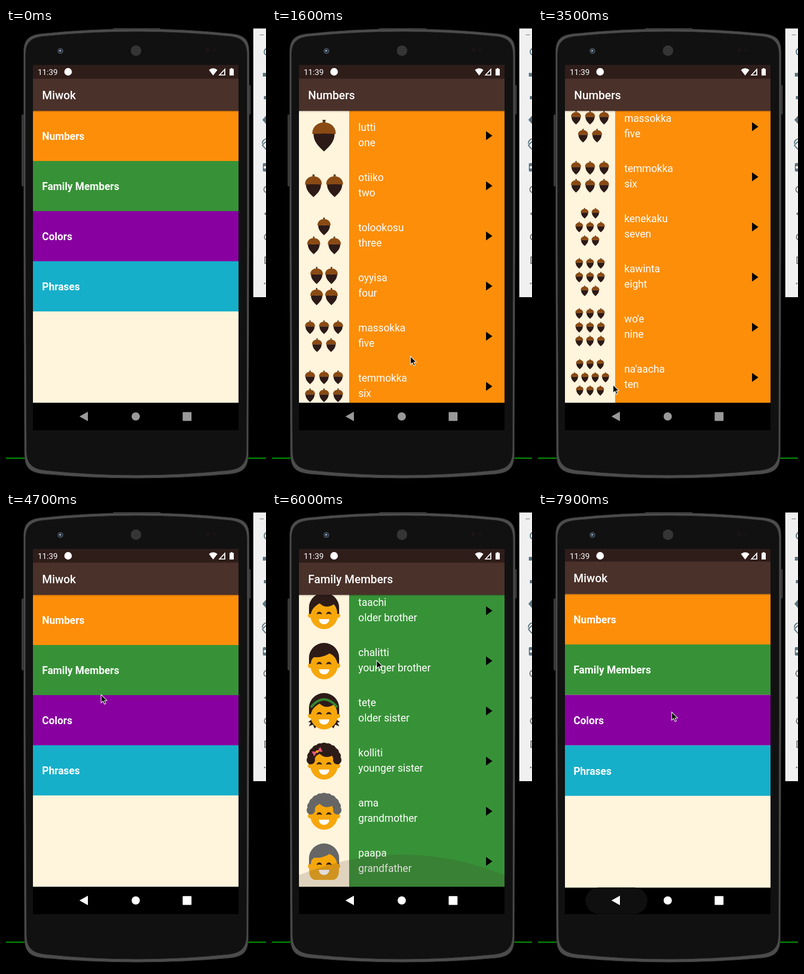
An HTML page for the animation above (8000 ms loop, 492x864 px).

```html
<!DOCTYPE html>
<html lang="en">
<head>
<meta charset="utf-8">
<title>Phone demo</title>
<style>
html, body { margin: 0; width: 100%; height: 100%; overflow: hidden; background: #000; }
svg { display: block; width: 492px; height: 864px; font-family: Roboto, "Noto Sans", sans-serif; }
.bar { font-size: 21.6px; font-weight: 500; fill: #fff; }
.cat { font-size: 19.5px; font-weight: 700; fill: #fff; }
.word { font-size: 19.5px; fill: #fff; }
.clock { font-size: 15.2px; fill: #fff; }

.win { transform-origin: 245.5px 416px; }
.glow { transform-origin: 245.5px 710px; }
.win, .fade, .dim, .list, .glow, .keys, .ripple, .cursor { animation: 8s linear infinite; }

#home { animation-name: home; }
@keyframes home {
  0%, 9.875% { transform: scale(1); animation-timing-function: cubic-bezier(.05,.7,.1,1); }
  14.875%, 50.62% { transform: scale(1.05); }
  50.625% { transform: scale(1.1); animation-timing-function: cubic-bezier(.05,.7,.1,1); }
  55.625% { transform: scale(1); }
  62.5% { transform: scale(1); animation-timing-function: cubic-bezier(.05,.7,.1,1); }
  67.5%, 96.245% { transform: scale(1.05); }
  96.25% { transform: scale(1.1); animation-timing-function: cubic-bezier(.1,.45,.4,1); }
  100% { transform: scale(1); }
}
.dim { animation-name: dim; }
@keyframes dim {
  0%, 9.875% { opacity: 0; }
  11%, 50.62% { opacity: .22; }
  50.625%, 62.5% { opacity: 0; }
  63.6%, 96.245% { opacity: .22; }
  96.25%, 100% { opacity: 0; }
}
#numbers { animation-name: numbers; }
@keyframes numbers {
  0%, 9.875% { transform: scale(.85); animation-timing-function: cubic-bezier(.05,.7,.1,1); }
  14.875% { transform: scale(1); }
  50.625% { transform: scale(1); animation-timing-function: cubic-bezier(.05,.7,.1,1); }
  55.625%, 100% { transform: scale(.9); }
}
#numbersFade { animation-name: numbersFade; }
@keyframes numbersFade {
  0%, 10.31% { opacity: 0; }
  10.94%, 51.06% { opacity: 1; }
  51.69%, 100% { opacity: 0; }
}
#numbers .list { animation-name: numbersList; }
@keyframes numbersList {
  0%, 20.625% { transform: translateY(0); animation-timing-function: cubic-bezier(.45,0,.5,1); }
  28.1%, 100% { transform: translateY(-397px); }
}
#numbers .glow { animation-name: numbersGlow; }
@keyframes numbersGlow {
  0%, 27.5% { transform: scaleY(0); opacity: 0; }
  28.6%, 29.4% { transform: scaleY(.46); opacity: .17; }
  33.75%, 100% { transform: scaleY(0); opacity: 0; }
}
#family { animation-name: family; }
@keyframes family {
  0%, 62.5% { transform: scale(.85); animation-timing-function: cubic-bezier(.05,.7,.1,1); }
  67.5% { transform: scale(1); }
  96.25% { transform: scale(1); animation-timing-function: cubic-bezier(.1,.45,.4,1); }
  100% { transform: scale(.9); }
}
#familyFade { animation-name: familyFade; }
@keyframes familyFade {
  0%, 62.94% { opacity: 0; }
  63.56%, 96.69% { opacity: 1; }
  97.31%, 100% { opacity: 0; }
}
#family .list { animation-name: familyList; }
@keyframes familyList {
  0%, 68.125% { transform: translateY(0); animation-timing-function: cubic-bezier(.45,0,.5,1); }
  74.4%, 100% { transform: translateY(-397px); }
}
#family .glow { animation-name: familyGlow; }
@keyframes familyGlow {
  0%, 73.75% { transform: scaleY(0); opacity: 0; }
  74.9%, 76.25% { transform: scaleY(1); opacity: .17; }
  81.9%, 100% { transform: scaleY(0); opacity: 0; }
}
.keys { animation-name: keys; }
@keyframes keys {
  0%, 49.3% { fill: #999; }
  50.6%, 100% { fill: #fff; }
}
.ripple { animation-name: ripple; }
@keyframes ripple {
  0%, 49.3% { opacity: 0; }
  50%, 51.5% { opacity: 1; }
  55%, 95% { opacity: 0; }
  95.9%, 98.9% { opacity: 1; }
  100% { opacity: .6; }
}
.cursor { animation-name: cursor; animation-timing-function: ease-in-out; }
@keyframes cursor {
  0%, 2.5% { transform: translate(500px, 300px); }
  8.75%, 9.75% { transform: translate(285px, 216px); }
  11.25% { transform: translate(279px, 242px); }
  18.75%, 20.625% { transform: translate(262px, 622px); animation-timing-function: cubic-bezier(.45,0,.5,1); }
  28.5%, 29.4% { transform: translate(255px, 202px); }
  43.75% { transform: translate(142px, 676px); }
  46.25%, 50.6% { transform: translate(146px, 735px); }
  58.1%, 58.75% { transform: translate(180px, 346px); }
  61.25%, 62.4% { transform: translate(185px, 312px); }
  67.5%, 68.125% { transform: translate(205px, 640px); animation-timing-function: cubic-bezier(.45,0,.5,1); }
  74.9%, 76.9% { transform: translate(198px, 281px); }
  88.75%, 96% { transform: translate(150px, 737px); }
  98.75% { transform: translate(253px, 379px); }
  100% { transform: translate(258px, 366px); }
}
</style>
</head>
<body>
<svg viewBox="0 0 492 864">
  <defs>
    <clipPath id="screen"><rect x="51" y="70" width="389" height="692"/></clipPath>
    <clipPath id="view"><rect x="51" y="157" width="389" height="553"/></clipPath>
    <linearGradient id="shade" x2="0" y2="1"><stop stop-opacity=".25"/><stop offset="1" stop-opacity="0"/></linearGradient>
    <pattern id="mesh" width="3" height="3" patternUnits="userSpaceOnUse">
      <rect width="3" height="3" fill="#222"/><circle cx="1.5" cy="1.5" r="1" fill="#5a5a5a"/>
    </pattern>
    <g id="acorn">
      <path d="M-3-30H3L2-23H-2Z" fill="#4a3a20"/>
      <path d="M-20-4H20C20 13 8 22 0 30C-8 22-20 13-20-4Z" fill="#2d1a17"/>
      <path d="M-22-3C-23-17-12-25 0-25S23-17 22-3Q0-5-22-3Z" fill="#8a4a14"/>
    </g>
    <g id="head" fill="#f6a70c">
      <circle cx="-26" cy="9" r="4.5"/><circle cx="26" cy="9" r="4.5"/>
      <ellipse cy="8" rx="26" ry="27"/>
    </g>
    <g id="smile">
      <path d="M-14 7a5 5 0 0 1 10 0q-5-2-10 0ZM4 7a5 5 0 0 1 10 0q-5-2-10 0Z" fill="#3a2418"/>
      <path d="M-10 16H10C9 29-9 29-10 16Z" fill="#fff"/>
    </g>
  </defs>

  <path d="M0 815H492" stroke="#00a000" stroke-width="2"/>

  <!-- emulator toolbar -->
  <path d="M468 1H492V510H468Z" fill="#f0f0f0"/>
  <path d="M480 13h8" stroke="#999" stroke-width="1.5"/>
  <g fill="#5b7784">
    <path d="M486 85h6v7h-6ZM488 129h4v6h-4ZM485 174l7-8v16ZM486 258q0-2 2-2h4v16h-4q-2 0-2-2Z"/>
    <circle cx="490" cy="264" r="2.5" fill="#f0f0f0"/>
  </g>
  <g fill="none" stroke="#5b7784" stroke-width="2">
    <path d="M492 39a7 7 0 0 0 0 12M485 219a10 10 0 0 1 7-9M485 222l7-7M485 222l7 8"/>
    <g stroke="#777"><circle cx="494" cy="306" r="6"/><circle cx="495" cy="396" r="6"/><path d="M492 434h-2v12h2"/></g>
  </g>
  <path d="M488 352l4-3v6Z" fill="#777"/><circle cx="489.5" cy="484" r="1.5" fill="#777"/>

  <!-- phone body -->
  <path d="M203 4V0H292V4Z" fill="#333"/>
  <rect x="29.5" y="164" width="6" height="136" rx="2" fill="#3c3c3c"/>
  <rect x="457" y="108" width="6" height="56" rx="2" fill="#3c3c3c"/>
  <path d="M33.500 46C33.500 23 42 14 66 11Q246-8 428 11C452 14 460 23 460 46V400L458.500 805C458.500 833 450 842 424 845Q246 861 72 845C44 842 35 833 35 805L33.500 400Z" fill="#4c4c4c" stroke="#2c2c2c"/>
  <path d="M37 52C37 29 45 19 69 16Q246-2 425 16C448 19 456 29 456 52V400L455 800C455 825 446 835 421 838Q246 856 75 838C48 835 39 825 39 800L37 400Z" fill="#111" stroke="#1c1c1c"/>
  <circle cx="103" cy="43.5" r="5.5" fill="#464a50"/><circle cx="103" cy="43.5" r="3.5" fill="#22344a"/><circle cx="102.500" cy="43" r="1.6" fill="#b4c6dc"/>
  <circle cx="246" cy="43" r="10" fill="url(#mesh)"/>
  <circle cx="381" cy="42" r="4" fill="#1b1414"/><circle cx="394" cy="42" r="3" fill="#1b1414"/>

  <g clip-path="url(#screen)">
    <path d="M51 70H440V762H51Z"/>
    <g class="win" id="home"></g>
    <g class="fade" id="numbersFade"><g class="win" id="numbers"></g></g>
    <g class="fade" id="familyFade"><g class="win" id="family"></g></g>

    <!-- status and navigation -->
    <text class="clock" x="60" y="89">11:39</text>
    <circle cx="117.5" cy="83" r="7.2" fill="#fff"/>
    <g fill="#fff">
      <path d="M384 79.5Q392 73 400 79.5L392 90Z"/>
      <path d="M415 76V90H402ZM413 81L406 88.3H413Z" fill-rule="evenodd"/>
      <path d="M425.5 76h3v1.5h2.5V90h-8V77.5h2.5Z"/>
    </g>
    <rect class="ripple" x="90" y="711.5" width="117" height="50" rx="25" fill="#0f0f0f"/>
    <g class="keys">
      <path d="M139 736L155 727V745Z"/><circle cx="245.5" cy="736" r="7.8"/><rect x="334.3" y="727.7" width="16.7" height="16.7" rx="1"/>
    </g>
  </g>

  <path class="cursor" d="M0 0V15.5L3.7 12.2L6.3 18L8.8 16.9L6.3 11.2H11Z" stroke="#fff" stroke-width="1.1"/>
</svg>
<script>
const TOP = 157, ROW = 95, HAIR = '#2d1b18', GREY = '#666';
const byId = id => document.getElementById(id);
const path = (d, fill) => `<path d="${d}" fill="${fill}"/>`;
const rect = (y, h, fill) => `<rect x="51" y="${y}" width="389" height="${h}" fill="${fill}"/>`;

const chrome = title => rect(70, 26, '#2f1d1a') + rect(96, TOP - 96, '#4a312a') +
  `<text class="bar" x="68.3" y="134.5">${title}</text>` +
  rect(TOP, 3, 'url(#shade)') + rect(710, 52, '#000');

const listPage = (title, color, words, icon) => {
  const rows = words.map(([miwok, english], i) => `<g transform="translate(0 ${204 + ROW * i})">
    <g transform="translate(98.5 0)">${icon(i)}</g>
    <text class="word" x="163.3" y="-9">${miwok}</text>
    <text class="word" x="163.3" y="19.5">${english}</text>
    <path d="M405-8.5L417 0L405 8.5Z"/></g>`).join('');
  return rect(TOP, 553, color) + `<g clip-path="url(#view)">
    <rect x="51" y="157" width="95" height="553" fill="#fff4dc"/>
    <g class="list">${rows}</g>
    <path class="glow" d="M51 710V688Q245.5 610 440 688V710Z" fill="#4a312a"/></g>` + chrome(title);
};

// Acorn layouts: counts per line, column gap, line gap, scale
const layouts = [
  [[1], 0, 0, 1], [[2], 40, 0, .72], [[1, 2], 39, 36, .56], [[2, 2], 28, 40, .54],
  [[3, 2], 26.5, 34, .43], [[3, 3], 26.5, 34, .43], [[2, 3, 2], 20.5, 26, .335],
  [[3, 3, 2], 20.5, 26, .335], [[3, 3, 3], 20.5, 26, .335], [[3, 4, 3], 19.5, 25, .32]
];
const acorns = i => {
  const [lines, dx, dy, s] = layouts[i];
  return lines.map((n, r) => Array.from({ length: n }, (_, c) => {
    const x = (c - (n - 1) / 2) * dx, y = (r - (lines.length - 1) / 2) * dy;
    return `<use href="#acorn" transform="translate(${x} ${y}) scale(${s})"/>`;
  }).join('')).join('');
};

const dome = (fringe, fill = HAIR) => path(`M-28.5 6V-6A28.5 28 0 0 1 28.5-6V6${fringe}Z`, fill);
const swoop = 'L25 4C23-5 18-11 10-14C-1-7-13-6-19-7C-23-4-25 0-25 5';
const parted = 'L25 6C25-3 22-8 18-12C6-4-4-9-8-14C-16-10-23-4-25 6';
const flat = 'L24 5L21-10Q0-15-21-10L-24 5';
const curls = fill => Array.from({ length: 11 }, (_, i) => {
  const a = Math.PI * (1 + i / 10);
  return `<circle cx="${25 * Math.cos(a)}" cy="${-2 + 25 * Math.sin(a)}" r="8" fill="${fill}"/>`;
}).join('') + dome(parted, fill);
const tuft = 'M-18 12L-30 21L-25 22L-29 29L-21 26L-18 33L-10 26Z';
const flips = path(tuft, HAIR) + `<g transform="scale(-1 1)">${path(tuft, HAIR)}</g>`;
const longHair = path('M-28-6C-34 12-31 30-26 33H26C31 30 34 12 28-6Z', HAIR);
const band = '<path d="M-25-7Q0-37 25-7" fill="none" stroke="#37852f" stroke-width="4.5"/>';
const bow = '<g transform="translate(-13 -18) rotate(-28)">' +
  path('M0 0L-9-5V5ZM0 0L9-5V5Z', '#ee5a78') + '<circle r="2.5" fill="#f6a70c"/></g>';
const stache = path('M-13 16Q0 7 13 16Q0 12-13 16Z', HAIR);
const beard = path('M-28 10Q-30 32-18 35H18Q30 32 28 10Q20 15 0 13Q-20 15-28 10Z', '#eba81f');

// Each face: parts behind the head, parts in front of it
const faces = [
  ['', dome(flat) + stache], [longHair, dome(parted)], ['', dome(swoop)],
  [flips, dome(swoop)], ['', dome(parted)], ['', dome(swoop)], [flips, dome(parted) + band],
  ['', curls(HAIR) + bow], ['', curls(GREY)], ['', dome(swoop, GREY) + beard]
];
const face = i => faces[i][0] + '<use href="#head"/>' + faces[i][1] + '<use href="#smile"/>';

const pairs = text => text.split(',').map(p => p.split(':'));
const numberWords = pairs("lutti:one,otiiko:two,tolookosu:three,oyyisa:four,massokka:five,temmokka:six,kenekaku:seven,kawinta:eight,wo'e:nine,na'aacha:ten");
const familyWords = pairs('әpә:father,әṭa:mother,angsi:son,tune:daughter,taachi:older brother,chalitti:younger brother,teṭe:older sister,kolliti:younger sister,ama:grandmother,paapa:grandfather');
const categories = pairs('Numbers:#fd8e09,Family Members:#379237,Colors:#8800a0,Phrases:#16afca');

byId('home').innerHTML = rect(TOP, 553, '#fff4dc') + categories.map(([name, color], i) =>
  rect(TOP + i * ROW, ROW, color) +
  `<text class="cat" x="68.3" y="${212 + i * ROW}">${name}</text>`).join('') +
  chrome('Miwok') + '<rect class="dim" x="51" y="70" width="389" height="692"/>';
byId('numbers').innerHTML = listPage('Numbers', '#fd8e09', numberWords, acorns);
byId('family').innerHTML = listPage('Family Members', '#379237', familyWords, face);
</script>
</body>
</html>
```
